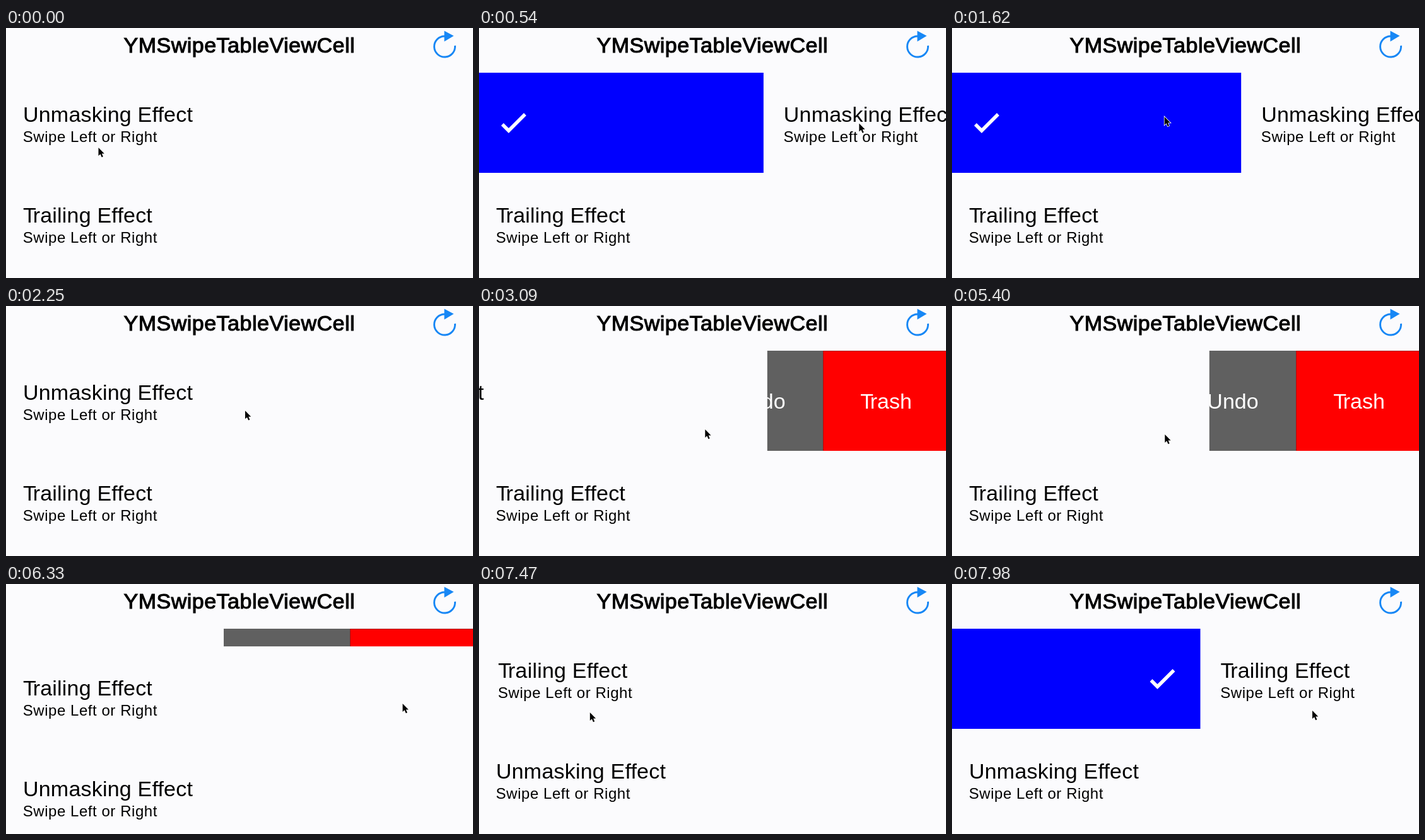
Animation of 740x397 px, one loop 8000 ms. Source, as an HTML page:

```html
<!DOCTYPE html>
<html lang="en">
<head>
<meta charset="utf-8">
<title>YMSwipeTableViewCell</title>
<style>
  html, body { margin: 0; width: 100%; height: 100%; overflow: hidden; background: #fbfbfd; }
  svg { display: block; width: 100vw; height: 100vh; }
  text { font-family: "Liberation Sans", Arial, sans-serif; font-size: 34px; }
  .head { letter-spacing: .5px; stroke: #000; stroke-width: 1.1px; }
  .name { letter-spacing: .2px; }
  .hint { font-size: 24px; letter-spacing: .55px; }
  .button { fill: #fff; text-anchor: middle; }
  .cover { fill: #fbfbfd; }
</style>
</head>
<body>
<svg viewBox="0 0 740 397">
  <defs>
    <path id="check" d="M37 82 L47 92 L73 66" fill="none" stroke="#fff" stroke-width="5.5"/>
    <g id="blank">
      <rect class="cover" x="-5" width="750" height="160"/>
      <text class="hint" x="26.7" y="110">Swipe Left or Right</text>
    </g>
    <g id="unmasking">
      <use href="#blank"/>
      <text class="name" x="27" y="78">Unmasking Effect</text>
    </g>
    <g id="trailing">
      <use href="#blank"/>
      <text class="name" x="27" y="78">T<tspan dx="-4">railing Effect</tspan></text>
    </g>
  </defs>
  <rect class="cover" width="740" height="397"/>

  <g id="first" transform="translate(0 71)">
    <g id="done">
      <rect width="740" height="159" fill="#00f"/>
      <use href="#check"/>
    </g>
    <g id="buttons">
      <rect x="345" width="200" height="159" fill="#606060"/>
      <rect x="545" width="200" height="159" fill="#f00"/>
      <path d="M545.5 159 V.5 H740" fill="none" stroke="#a81010"/>
      <text class="button" x="445" y="92">Undo</text>
      <text class="button" x="645" y="92">T<tspan dx="-4">rash</tspan></text>
    </g>
    <use id="firstCell" href="#unmasking"/>
  </g>

  <g id="second">
    <g id="trail">
      <rect width="740" height="159" fill="#00f"/>
      <use id="trailCheck" href="#check"/>
    </g>
    <use id="secondCell" href="#trailing"/>
  </g>

  <use id="third" href="#unmasking"/>

  <text class="head" x="186.5" y="39">YMSwipeTableViewCell</text>
  <g fill="none" stroke="#1787f5" stroke-width="2.9">
    <path d="M695 13 A16.5 16.5 0 1 0 711.5 28"/>
    <path d="M694.5 4.5 L709.5 12.5 L694.5 21.5 Z" fill="#1787f5" stroke="none"/>
  </g>

  <path id="cursor" d="M.5 0 V13 L3.5 10.3 L5.7 15.2 L7.9 14.2 L5.8 9.4 H9.8 Z" stroke="#fff" stroke-width="1.6" paint-order="stroke"/>
</svg>
<script>
const LOOP = 8000, STEP = 30, WIDTH = 750, INSET = 5, ROW = 160, TOP = 71;
const SNAP = 300, CHECK_GAP = 115, COLLAPSE = 6110;

const $ = id => document.getElementById(id);
const move = (id, x, y) => $(id).setAttribute('transform', `translate(${x} ${y})`);
const show = (id, on) => $(id).style.display = on ? '' : 'none';
const clamp = v => Math.max(0, Math.min(1, v));
const mix = (a, b, p) => a + (b - a) * p;
const smooth = p => p * p * (3 - 2 * p);
const easeOut = p => 1 - (1 - p) ** 3;
const at = (t, x, y) => ({ t, x, y });

// press point, release point, row and the offset it settles at
const gestures = [
  { press: at(90, 146, 190), release: at(600, 620, 150), row: 1, rest: WIDTH },
  { press: at(1320, 623, 141), release: at(1845, 150, 141), row: 1, rest: 0 },
  { press: at(2700, 646, 196), release: at(3255, 280, 196), row: 1, rest: -400 },
  { press: at(4140, 453, 196), release: at(4590, 690, 200), row: 1, rest: 0 },
  { press: at(5040, 674, 204), release: at(5503, 288, 204), row: 1, rest: -400 },
  { press: at(6060, 628, 190), release: at(6420, 628, 190) },
  { press: at(7440, 172, 204), release: at(LOOP, 572, 201), row: 2, rest: 400 }
];
const stops = gestures.flatMap(g => [g.press, g.release]);

function pointerAt(t) {
  const next = stops.findIndex(s => s.t > t);
  if (next < 1) return next ? stops[stops.length - 1] : stops[0];
  const a = stops[next - 1], b = stops[next];
  const p = smooth((t - a.t) / (b.t - a.t));
  return { x: mix(a.x, b.x, p), y: mix(a.y, b.y, p) };
}

// the row follows the pointer while held, then settles
function offsetAt(t, row) {
  const done = gestures.filter(g => g.row === row && g.press.t <= t);
  const drag = done.pop();
  if (!drag) return 0;
  const { press, release, rest } = drag;
  const base = done.length ? done.pop().rest : 0;
  const held = base + pointerAt(Math.min(t, release.t)).x - press.x;
  return mix(held, rest, easeOut(clamp((t - release.t) / SNAP)));
}

function draw(t) {
  const lift = ROW * smooth(clamp((t - COLLAPSE) / SNAP));
  const a = offsetAt(t, 1), b = offsetAt(t, 2);
  const tip = pointerAt(t);

  show('first', lift < ROW);
  show('done', a > 0);
  show('buttons', a < 0);
  move('firstCell', a, 0);

  move('second', 0, TOP + ROW - lift);
  show('trail', b > 0);
  move('secondCell', b, 0);
  move('trailCheck', b - INSET - CHECK_GAP, 0);

  move('third', 0, TOP + 2 * ROW - lift);
  move('cursor', tip.x, tip.y);
}

const start = performance.now();
function tick() {
  const t = (performance.now() - start) % LOOP;
  draw(Math.floor(t / STEP) * STEP);
  requestAnimationFrame(tick);
}
tick();
</script>
</body>
</html>
```
